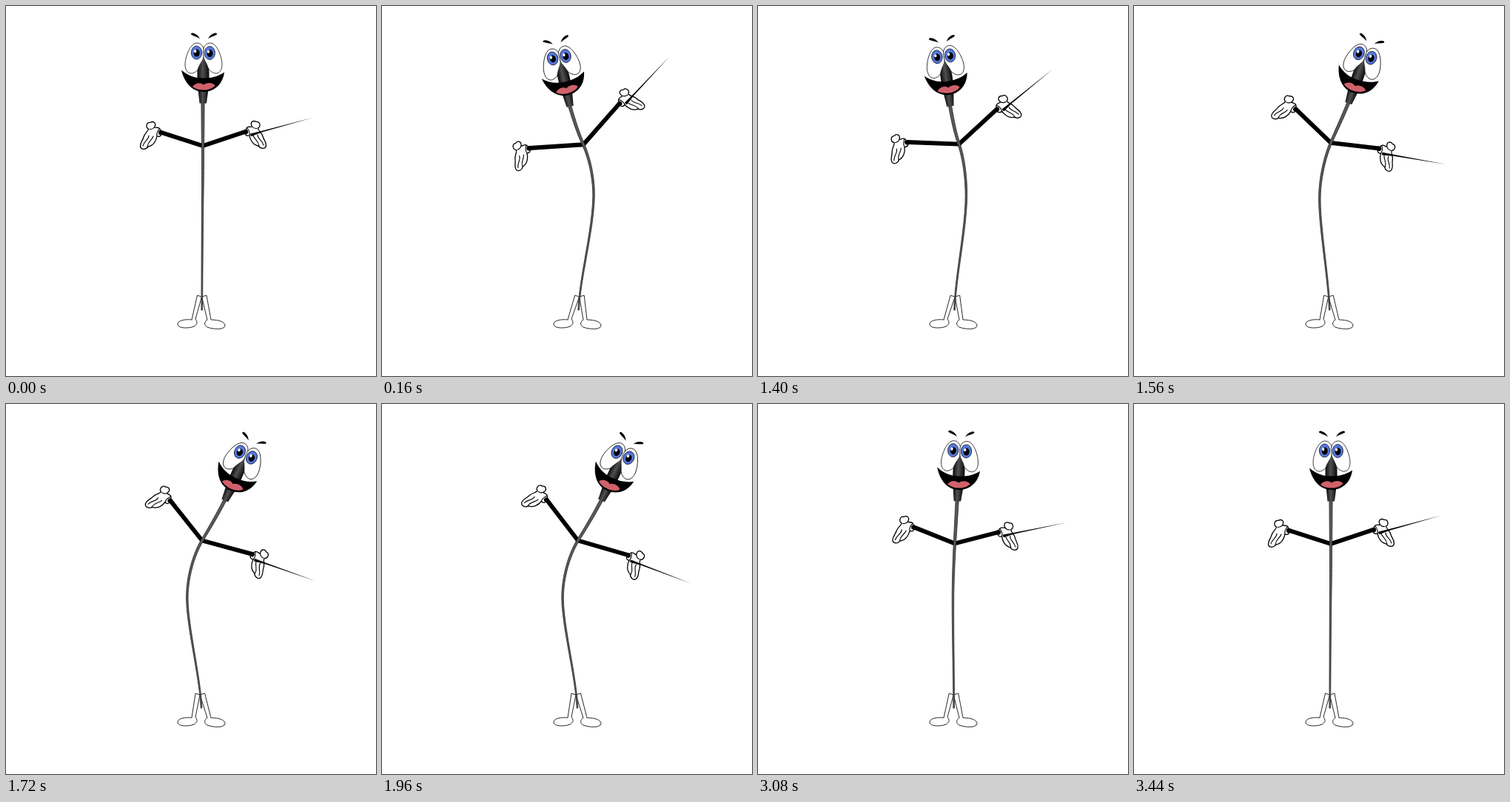
Recreate the animation shown at these times as an HTML page. Size 500 by 500 pixels, loop 3480 ms.

```html
<!DOCTYPE html>
<html lang="en">
<head>
<meta charset="utf-8">
<title>Microphone conductor</title>
<style>
  html, body { margin: 0; width: 100%; height: 100%; overflow: hidden; background: #fff; }
  svg { display: block; width: 100vw; height: 100vh; }
  .line { fill: none; stroke: #000; stroke-width: 1.1; stroke-linecap: round; }
  .skin { fill: #fff; stroke: #000; stroke-width: 1.3; stroke-linejoin: round; }
  .leg { fill: #fff; stroke: #111; stroke-width: .9; stroke-linejoin: round; }
  .eye { fill: #fff; stroke: #111; stroke-width: .8; }
  .iris { fill: #5678dc; stroke: #10142c; stroke-width: .8; }
  .arm { stroke: #000; stroke-width: 5.8; stroke-linecap: round; }
  #stem { fill: #585858; stroke: #2a2a2a; stroke-width: .8; }
</style>
</head>
<body>
<svg viewBox="0 0 500 500">
  <defs>
    <linearGradient id="metal">
      <stop offset="0" stop-color="#0b0b0b"/>
      <stop offset=".45" stop-color="#505050"/>
      <stop offset="1" stop-color="#080808"/>
    </linearGradient>
    <g id="hand">
      <path class="skin" d="M2,-5 C4,-8 7,-6 9.500,-7 C6,-13 11,-16 15,-13.500 C20,-15 22,-7 17.500,-5 C18,-1 22,0 24,6 C25,11 29,13 28.500,19 C27,24 21,23 18,19 C11,18 7,11 6,5 C3,6 0,5 0,1 Z"/>
      <path class="line" d="M9.500,-7 Q12,-4 16,-4.500 M11,5 C13,11 18,11 19,19 M17,4 C17,10 23,11 25,18 M3,-5 Q7,0 6,5"/>
      <circle cx="1" cy="0" r="3.200"/>
    </g>
    <path id="brow" d="M250,38.500 C249.500,36.500 251.500,36 253.500,36.800 C257.500,38 260,40.500 262,44.200 C258,41.500 254,41 250,38.500Z"/>
    <path id="eye" class="eye" d="M258,50 C249,50 242,69 242,79 C242,87 246,91.500 251,91 C260,90 267.500,76 267.500,62 C267.500,54 263,50 258,50Z"/>
    <g id="iris">
      <ellipse class="iris" rx="7.200" ry="9"/>
      <ellipse cx=".2" cy=".6" rx="4" ry="5"/>
      <ellipse cx="-1.800" cy="-1.800" rx="1.700" ry="2.100" fill="#fff"/>
    </g>
  </defs>

  <path id="legL" class="leg"/>
  <path id="legR" class="leg"/>
  <line id="armL" class="arm"/>
  <line id="armR" class="arm"/>
  <path id="stem"/>
  <g id="handL"><use href="#hand" transform="scale(-1 1)"/></g>
  <g id="handR">
    <use href="#hand"/>
    <path d="M7.500,2.500 L21,-.8 L92,-19.200 L23,.6 L9,6 Q6.500,5.500 7.500,2.500Z"/>
  </g>

  <g id="head">
    <use href="#brow"/>
    <use href="#brow" transform="matrix(-1 0 0 1 535 0)"/>
    <use href="#eye"/>
    <use href="#eye" transform="matrix(-1 0 0 1 534 0)"/>
    <use href="#iris" x="257.500" y="63"/>
    <use href="#iris" x="275.300" y="63.500"/>
    <path fill="url(#metal)" d="M259.500,112 H273.500 L271,131.500 H261.500 Z"/>
    <path fill="url(#metal)" d="M267,70 C263,77 258.500,83 258.500,89 V101 H274.500 V89 C274.500,83 271,77 267,70Z"/>
    <path d="M237,86.500 C246,94.500 256,97.500 267,97.500 C278,97.500 287,95 295,89.500 C293,106 281,116 267,116 C252,116 241,104 237,86.500Z"/>
    <path fill="#d0616b" d="M252,109 C256,103.500 263,103 267,106.500 C271,103 279,103 282.500,107.500 C276,115 260,115.500 252,109Z"/>
  </g>
</svg>
<script>
const LOOP = 3480, STEP = 40;
const $ = id => document.getElementById(id);

// stem: Bezier chain from neck through shoulder and waist to the foot
const rest = {
  stem: [266,131, 266,150, 266,170, 266,189, 266,210, 266,235, 265.7,258, 265.3,300, 265,370, 264.7,411],
  head: 0, left: [210,171,0], right: [323,170,0], hip: 0
};
const leanLeft = {
  stem: [252,136, 258,153, 264,170, 273,187, 283,207, 289,232, 289,255, 289,300, 267,370, 265.8,411],
  head: -14.5, left: [198,195,-27], right: [320,127,-36], hip: 2.5
};
const leanRight = {
  stem: [296.5,130, 286,150, 275,168, 264.8,184.5, 254,202, 244,232, 244,262, 244,300, 262.5,370, 264,411],
  head: 25, left: [223,130,29], right: [332,204,36], hip: -2.5
};
const moves = [
  { at: 0, rate: .0225, from: rest, to: leanLeft },
  { at: 1355, rate: .0164, from: leanLeft, to: leanRight },
  { at: 2845, rate: .0164, from: leanRight, to: rest }
];

// critically damped spring
const settle = x => 1 - (1 + x) * Math.exp(-x);
const mix = (a, b, p) => Array.isArray(a) ? a.map((v, i) => mix(v, b[i], p)) : a + (b - a) * p;

function poseAt(t) {
  const m = moves.filter(v => v.at <= t).pop();
  const p = settle((t - m.at) * m.rate);
  const pose = {};
  for (const key in rest) pose[key] = mix(m.from[key], m.to[key], p);
  return pose;
}

function bezier(c, i, t) {
  const s = 1 - t, [a, b, d, e] = [c[i], c[i + 2], c[i + 4], c[i + 6]];
  return {
    pos: s * s * s * a + 3 * s * s * t * b + 3 * s * t * t * d + t * t * t * e,
    dir: s * s * (b - a) + 2 * s * t * (d - b) + t * t * (e - d)
  };
}

// tapered outline around the chain
function stemPath(c) {
  const one = [], two = [], n = 12;
  for (let j = 0; j <= 3 * n; j++) {
    const seg = Math.min(2, Math.floor(j / n)), t = j / n - seg;
    const x = bezier(c, seg * 6, t), y = bezier(c, seg * 6 + 1, t);
    const w = (2.1 - 1.3 * j / (3 * n)) / Math.hypot(x.dir, y.dir);
    const dx = -y.dir * w, dy = x.dir * w;
    one.push(`${(x.pos + dx).toFixed(2)},${(y.pos + dy).toFixed(2)}`);
    two.unshift(`${(x.pos - dx).toFixed(2)},${(y.pos - dy).toFixed(2)}`);
  }
  return `M${one.concat(two).join("L")}Z`;
}

function limb(side, x, y, [wx, wy, turn]) {
  const arm = $("arm" + side);
  Object.entries({ x1: x, y1: y, x2: wx, y2: wy }).forEach(([k, v]) => arm.setAttribute(k, v));
  $("hand" + side).setAttribute("transform", `translate(${wx} ${wy}) rotate(${turn})`);
}

function draw(t) {
  const { stem, head, left, right, hip } = poseAt(t);
  $("stem").setAttribute("d", stemPath(stem));
  $("head").setAttribute("transform", `translate(${stem[0]} ${stem[1]}) rotate(${head}) translate(-266 -131)`);
  limb("L", stem[6], stem[7], left);
  limb("R", stem[6], stem[7], right);
  $("legL").setAttribute("d", `M${264.5 + hip},393 L${258.5 + hip},391 L251,424 C241,423 232,425 232,430 C232,436 247,436 254,433 C259,430 259,427 256,423 Z`);
  $("legR").setAttribute("d", `M${264.5 + hip},393 L${271 + hip},391 L277,424 C288,424 296,427 296,432 C295,438 280,437 272,434 C267,431 268,427 272,424 Z`);
}

function tick() {
  const t = performance.now() % LOOP;
  draw(Math.floor(t / STEP) * STEP);
  requestAnimationFrame(tick);
}
tick();
</script>
</body>
</html>
```
